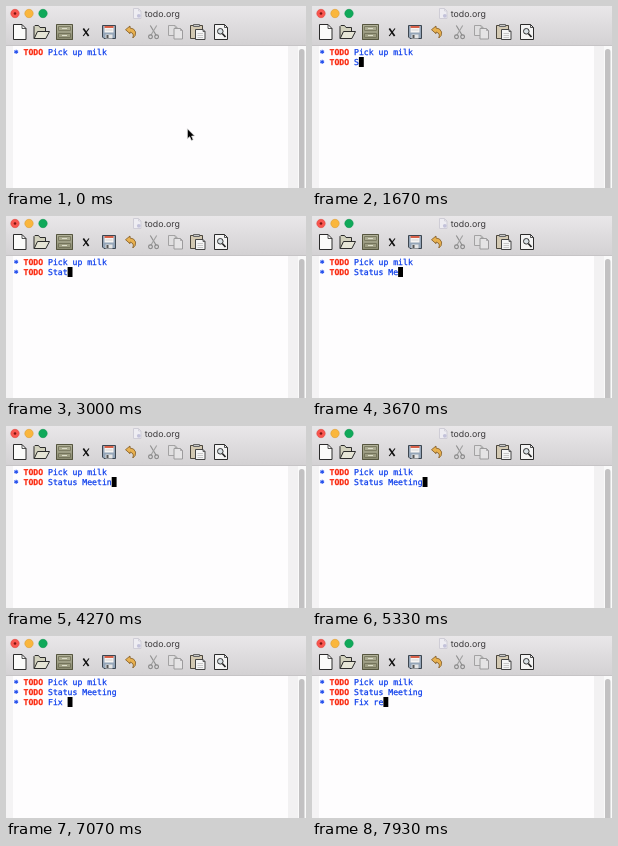
These frames come from a looping animation (300 px wide and 182 px high, 8 s). An HTML page with a canvas:

```html
<!DOCTYPE html>
<html lang="en">
<head>
<meta charset="utf-8">
<title>todo.org</title>
<style>
html, body { margin: 0; width: 100%; height: 100%; overflow: hidden; background: #fff; }
canvas { display: block; width: 300px; height: 182px; }
</style>
</head>
<body>
<canvas id="stage"></canvas>
<script>
const W = 300, H = 182, LOOP = 8000;
const COL = 4.9, LEFT = 7.7, TOP = 41, ROW = 10, BAR = 40;
const BLUE = '#0a3cec', RED = '#fb2a10', INK = '#2b2b2b';
const MONO = '8.14px "DejaVu Sans Mono", monospace';

const canvas = document.getElementById('stage');
const ctx = canvas.getContext('2d');
const dpr = window.devicePixelRatio || 1;
canvas.width = W * dpr;
canvas.height = H * dpr;
ctx.scale(dpr, dpr);
ctx.textRendering = 'geometricPrecision';
ctx.lineJoin = 'round';

// Each edit: time, number of headings, text of the last heading
const edits = [
  [0, 1, 'Pick up milk'],
  [930, 2, ''], [1670, 2, 'S'], [1870, 2, 'Sa'], [2000, 2, 'Sat'],
  [2330, 2, 'S'], [2530, 2, 'St'], [2670, 2, 'Sta'], [2870, 2, 'Stat'],
  [3200, 2, 'Statu'], [3270, 2, 'Status'], [3330, 2, 'Status '],
  [3530, 2, 'Status M'], [3670, 2, 'Status Me'], [3800, 2, 'Status Mee'],
  [3930, 2, 'Status Meet'], [4070, 2, 'Status Meeti'],
  [4270, 2, 'Status Meetin'], [4400, 2, 'Status Meeting'],
  [5470, 3, ''], [6600, 3, 'F'], [6730, 3, 'Fi'], [6870, 3, 'Fix'],
  [7070, 3, 'Fix '], [7600, 3, 'Fix r'], [7870, 3, 'Fix re']
];
const done = ['Pick up milk', 'Status Meeting'];
const cursorOff = [[0, 130], [600, 930], [1400, 1670], [4870, 5330], [5930, 6470], [7530, 7600]];
const POINTER_GONE = 930;

function rect(x, y, w, h, fill, line) {
  ctx.fillStyle = fill;
  ctx.fillRect(x, y, w, h);
  if (line) {
    ctx.strokeStyle = line;
    ctx.lineWidth = 1;
    ctx.strokeRect(x + .5, y + .5, w - 1, h - 1);
  }
}

function poly(points, fill, line, width = 1) {
  ctx.beginPath();
  points.forEach(([x, y]) => ctx.lineTo(x, y));
  ctx.closePath();
  ctx.fillStyle = fill;
  ctx.fill();
  if (line) {
    ctx.strokeStyle = line;
    ctx.lineWidth = width;
    ctx.stroke();
  }
}

function stroke(points, color, width) {
  ctx.beginPath();
  points.forEach(([x, y]) => ctx.lineTo(x, y));
  ctx.strokeStyle = color;
  ctx.lineWidth = width;
  ctx.stroke();
}

function disc(x, y, r, fill, line, width = 1) {
  ctx.beginPath();
  ctx.arc(x, y, r, 0, 7);
  if (fill) { ctx.fillStyle = fill; ctx.fill(); }
  if (line) { ctx.strokeStyle = line; ctx.lineWidth = width; ctx.stroke(); }
}

function page(x, y, w, h, fold, fill, line) {
  poly([[x, y], [x + w - fold, y], [x + w, y + fold], [x + w, y + h], [x, y + h]], fill, line);
  stroke([[x + w - fold, y], [x + w - fold, y + fold], [x + w, y + fold]], line, .8);
}

function textLines(x, y, w, n, color) {
  for (let i = 0; i < n; i++) stroke([[x, y + i * 2], [x + w, y + i * 2]], color, .7);
}

function fade(y1, y2, from, to) {
  const g = ctx.createLinearGradient(0, y1, 0, y2);
  g.addColorStop(0, from);
  g.addColorStop(1, to);
  return g;
}

function titleBar() {
  rect(0, 0, W, BAR, fade(0, BAR, '#e9e7e9', '#d3d1d3'));
  rect(0, BAR - 1, W, 1, '#c6c4c6');
  disc(9, 7.5, 4.2, '#f9564f', '#dd4a42', .6);
  disc(9, 7.5, 1.3, '#7d1410');
  disc(23, 7.5, 4.2, '#fab63c', '#dc9c34', .6);
  disc(37, 7.5, 4.2, '#10a95a', '#0e9650', .6);
  page(127.5, 2.5, 7.5, 10, 2.5, '#eeedf2', '#cfcdd6');
  disc(132.8, 9.8, 1.9, '#c3c2da');
  ctx.font = '8.8px Inter, "Open Sans", sans-serif';
  ctx.fillStyle = '#3c3a3c';
  ctx.fillText('todo.org', 138.8, 11);
}

function folder() {
  poly([[28, 32.5], [28, 20.5], [29, 19.5], [32.5, 19.5], [34, 21.5], [39.5, 21.5], [39.5, 32.5]], '#d2d1bd', INK);
  poly([[28.2, 32.5], [31.5, 25.5], [43.5, 25.5], [39.8, 32.5]], '#e6e5d6', INK);
}

function cabinet() {
  rect(50, 18, 17, 16, fade(18, 34, '#b4b49c', '#88886e'), '#55553f');
  rect(52, 20, 13, 5, '#a9a98f', '#7c7c63');
  rect(52, 27, 13, 5, '#9d9d82', '#74745c');
  rect(56, 22, 5, 1, '#dcdcca');
  rect(56, 29, 5, 1, '#dcdcca');
}

function floppy() {
  poly([[96.5, 19.5], [109.5, 19.5], [109.5, 32.5], [98, 32.5], [96.5, 31]], '#94a5b8', '#3d4650');
  rect(98.5, 20, 9, 6.5, '#f6f4f2');
  rect(98.5, 20, 9, 2, '#d8624a');
  textLines(99.5, 24, 7, 1, '#c4c4c4');
  rect(99.5, 28.5, 7, 4, '#e4e4e4');
  rect(100.5, 29, 2, 3, '#555');
}

function undo() {
  poly([[119.5, 23.7], [124, 20], [124, 22], [127.5, 23], [129.6, 26], [129.2, 29.5], [126.8, 32],
    [127.4, 29], [126.3, 27], [124, 26], [124, 27.7]], '#e8b150', '#805a22', .8);
}

function scissors() {
  stroke([[144.3, 19.5], [150, 29]], '#8c8c8c', 1.1);
  stroke([[150.7, 19.5], [145, 29]], '#a0a0a0', 1.1);
  disc(144.5, 30.8, 1.9, null, '#858585', 1.1);
  disc(150.6, 30.8, 1.9, null, '#858585', 1.1);
}

function copyPages() {
  page(162.5, 19.5, 8.5, 10, 2, '#e0dfe0', '#a3a2a3');
  page(168, 22.5, 8.5, 10.5, 2, '#e5e4e5', '#9c9b9c');
}

function paste() {
  rect(184, 19, 13, 14, '#d3c9b2', '#4a453c');
  rect(187, 18, 7, 3, '#c8c8c8', '#666');
  page(189.5, 23.5, 9.5, 10, 2, '#f5f5f5', '#444');
  textLines(191.5, 27.5, 5.5, 3, '#b5b5b5');
}

function search() {
  page(208.5, 18.5, 13, 15, 3, '#f4f4f4', INK);
  stroke([[216.3, 27.5], [219.5, 31]], '#222', 1.7);
  disc(214.3, 25.3, 2.8, '#d9e1e6', '#333', 1);
}

function toolbar() {
  page(7.5, 18.5, 12.5, 15, 4, '#fbfbfa', INK);
  folder();
  cabinet();
  stroke([[77.3, 22.5], [82.6, 30]], '#111', 1.7);
  stroke([[83, 22.5], [77.2, 30]], '#111', 1.2);
  floppy();
  undo();
  scissors();
  copyPages();
  paste();
  search();
}

function buffer() {
  rect(0, BAR, W, H - BAR, '#fefdfe');
  rect(0, BAR, 7, H - BAR, '#f4f3f4');
  rect(282, BAR, 10, H - BAR, '#f2f1f2');
  rect(292, BAR, 8, H - BAR, '#fafafa');
  ctx.fillStyle = '#c2c1c2';
  ctx.beginPath();
  ctx.roundRect(293, 43, 5.5, H, 2.7);
  ctx.fill();
}

function put(text, col, row, color, weight = '', drop = 0) {
  ctx.font = weight + ' ' + MONO;
  ctx.fillStyle = ctx.strokeStyle = color;
  ctx.lineWidth = .25;
  [...text].forEach((ch, i) => {
    const x = LEFT + (col + i) * COL, y = TOP + row * ROW + 8 + drop;
    ctx.fillText(ch, x, y);
    ctx.strokeText(ch, x, y);
  });
}

function heading(row, text) {
  put('*', 0, row, BLUE, 'bold', 1.3);
  put('TODO', 2, row, RED, 'bold');
  put(text, 7, row, BLUE);
}

function pointer(x, y) {
  poly([[x, y], [x, y + 10], [x + 2.3, y + 8], [x + 4, y + 11.8], [x + 5.8, y + 11],
    [x + 4.2, y + 7.4], [x + 7.2, y + 7.2]], '#000', '#ddd', .7);
}

function draw(t) {
  const [, count, text] = edits.findLast(e => e[0] <= t);
  titleBar();
  toolbar();
  buffer();
  for (let i = 0; i < count - 1; i++) heading(i, done[i]);
  heading(count - 1, text);
  if (!cursorOff.some(([from, to]) => t >= from && t < to))
    rect(LEFT + (7 + text.length) * COL, TOP + (count - 1) * ROW, COL, ROW, '#000');
  if (t < POINTER_GONE) pointer(181.4, 122.7);
}

const start = performance.now();
function tick() {
  draw((performance.now() - start) % LOOP);
  requestAnimationFrame(tick);
}
tick();
</script>
</body>
</html>
```
